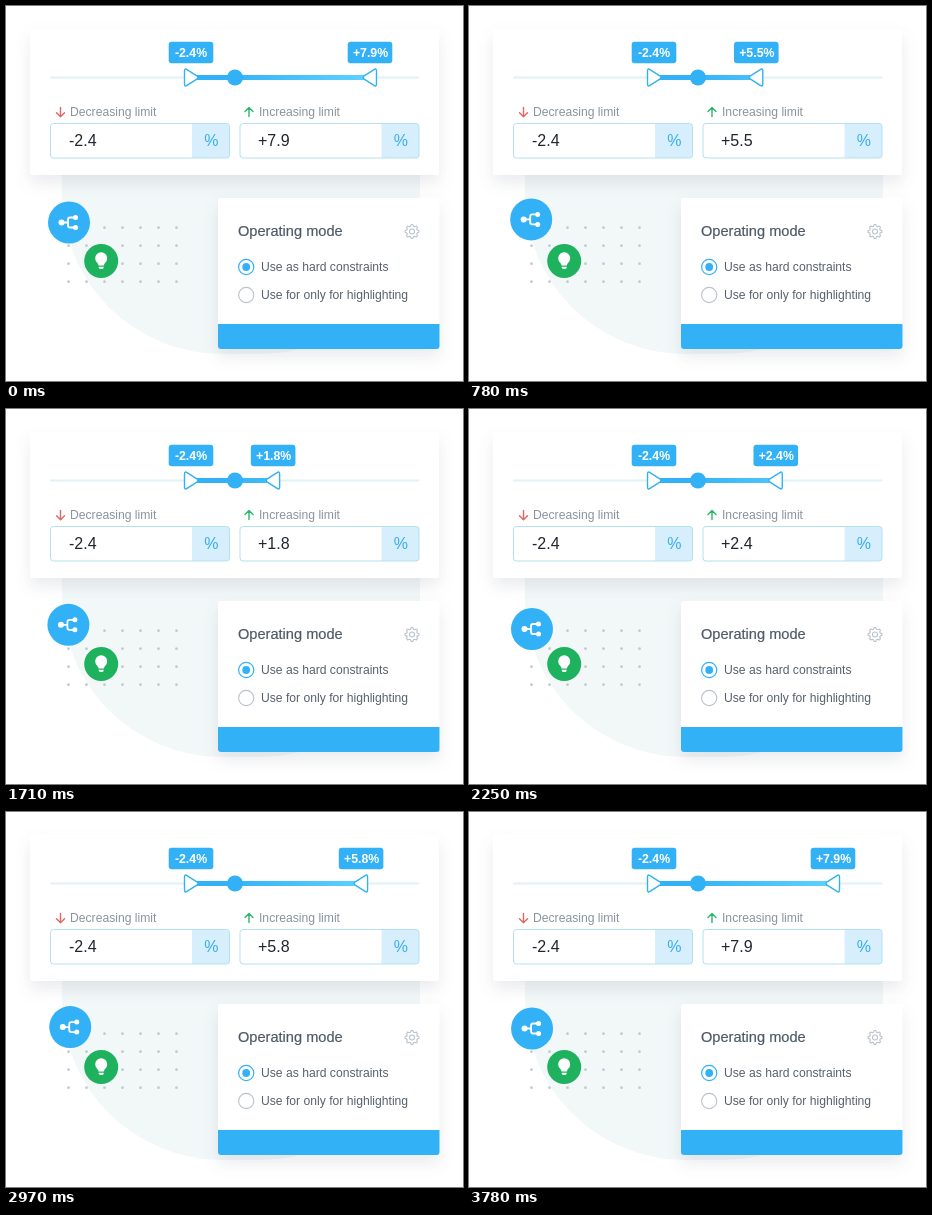
Animation, 457 px wide and 375 px high, one loop 3.81 s. Source, as an HTML page:

```html
<!DOCTYPE html>
<html lang="en">
<head>
<meta charset="utf-8">
<title>Limits and operating mode</title>
<style>
  html, body { margin: 0; width: 100%; height: 100%; overflow: hidden; background: #fff; }
  svg { display: block; width: 457px; height: 375px; font: 12.15px "Liberation Sans", Arial, sans-serif; }
  .card { fill: #fff; filter: drop-shadow(0 8px 8px rgba(45, 55, 90, .1)); }
  .blue { fill: #32b1f6; }
  .line { fill: none; stroke-linecap: round; stroke-linejoin: round; }
  .handle { fill: #fff; stroke: #32b1f6; stroke-width: 1.4; stroke-linejoin: round; }
  .tag { fill: #fff; font-size: 12.3px; font-weight: bold; text-anchor: middle; }
  .value { fill: #20262d; font-size: 16px; }
  .unit { fill: #38ade6; font-size: 16px; text-anchor: middle; }
  .caption { fill: #89949e; }
  .option { fill: #56616d; }
  .title { fill: #4d5966; stroke: #4d5966; stroke-width: .2px; font-size: 14.6px; }
</style>
</head>
<body>
<svg viewBox="0 0 457 375">
  <defs>
    <linearGradient id="range" gradientUnits="userSpaceOnUse" x1="215" y1="0" x2="364" y2="0">
      <stop offset="0" stop-color="#32b1f6"/>
      <stop offset="1" stop-color="#5fd2ff"/>
    </linearGradient>
    <g id="field">
      <rect x=".5" y=".5" width="179" height="34.5" rx="3" fill="#fff"/>
      <path d="M142 .5H176.5Q179.5 .5 179.5 3.5V32Q179.5 35 176.5 35H142Z" fill="#d7effd"/>
      <rect x=".5" y=".5" width="179" height="34.5" rx="3" fill="none" stroke="#b4e1ee"/>
      <text class="unit" x="161.3" y="23">%</text>
    </g>
    <path id="pointer" class="handle" d="M-6.5 65V78Q-6.5 81 -4 79.4L5.8 73.2Q8 71.5 5.8 69.8L-4 63.6Q-6.5 62 -6.5 65Z"/>
    <rect id="plate" class="blue" x="-22.3" y="35.7" width="44.6" height="21.5" rx="3"/>
  </defs>

  <path d="M56 160V188A160 160 0 0 0 216 348H254A160 160 0 0 0 414 188V160Z" fill="#f2f7f8"/>
  <g id="dots" fill="#c3cacf"></g>

  <rect class="card" x="24" y="23" width="409" height="146" rx="2"/>
  <path class="line" d="M45 71.5H412.5" stroke="#e0f2f2" stroke-width="2"/>
  <path id="bar" stroke="url(#range)" stroke-width="5"/>
  <circle class="blue" cx="229" cy="71.5" r="8"/>
  <g transform="translate(185)">
    <use href="#pointer"/>
    <use href="#plate"/>
    <text class="tag" y="50.5">-2.4%</text>
  </g>
  <g id="upper">
    <use href="#pointer" transform="scale(-1 1)"/>
    <use href="#plate"/>
    <text class="tag" id="tag" x=".5" y="50.5"></text>
  </g>

  <path class="line" d="M54.5 101.5V110.5M50.5 106.7L54.5 110.7L58.5 106.7" stroke="#e0675f" stroke-width="1.4"/>
  <path class="line" d="M243 110.5V101.5M239 105.5L243 101.5L247 105.5" stroke="#2bb56a" stroke-width="1.4"/>
  <text class="caption" x="64" y="110">Decreasing limit</text>
  <text class="caption" x="253" y="110">Increasing limit</text>
  <use href="#field" x="44" y="117"/>
  <use href="#field" x="233.5" y="117"/>
  <text class="value" x="63" y="140">-2.4</text>
  <text class="value" id="value" x="252" y="140"></text>

  <rect class="card" x="212" y="192" width="221.5" height="151" rx="3"/>
  <path class="blue" d="M212 318H433.5V340Q433.5 343 430.5 343H215Q212 343 212 340Z"/>
  <text class="title" x="232" y="229.7">Operating mode</text>
  <g class="line" stroke="#b9c2cb" stroke-width="1.1">
    <path id="gear"/>
    <circle cx="406" cy="225.5" r="2.5"/>
    <circle cx="240.2" cy="289" r="7.6"/>
  </g>
  <circle cx="240.2" cy="261" r="7.6" fill="none" stroke="#32b1f6" stroke-width="1.2"/>
  <circle class="blue" cx="240.2" cy="261" r="3.9"/>
  <text class="option" x="255" y="264.5">Use as hard constraints</text>
  <text class="option" x="255" y="292.7">Use for only for highlighting</text>

  <g id="badge">
    <circle class="blue" r="21"/>
    <path class="line" d="M-7 0H-1M6 -5H1Q-1 -5 -1 -3V3Q-1 5 1 5H6" stroke="#fff" stroke-width="1.8"/>
    <g fill="#fff">
      <circle cx="-7.5" r="3"/>
      <circle cx="6.5" cy="-5" r="2.5"/>
      <circle cx="6.5" cy="5" r="2.5"/>
    </g>
  </g>
  <circle cx="95.2" cy="255" r="17" fill="#1fb25e"/>
  <path d="M92.5 259.5Q92.5 257.8 91 256.5A6 6 0 1 1 99.4 256.5Q97.9 257.8 97.9 259.5ZM92.7 260.7H97.7V261.5Q97.7 263 95.2 263Q92.7 263 92.7 261.5Z" fill="#fff"/>
</svg>
<script>
const LOOP = 3810, STEP = 30;
const $ = id => document.getElementById(id);

// Badge drift: time, x, y
const drift = [
  [0, 63, 216.5], [780, 62.2, 213.4], [1710, 62.4, 215.8], [2250, 63, 220],
  [2700, 63.3, 216.2], [3270, 65, 214.6], [LOOP, 63, 216.5]
];

const phase = (t, from, to) => Math.min(1, Math.max(0, (t - from) / (to - from)));
const easeOut = p => 1 - (1 - p) ** 3;
const easeInOut = p => (1 - Math.cos(Math.PI * p)) / 2;

// Smooth closed curve through the drift points
function driftAt(t, axis) {
  const n = drift.length - 1;
  const point = i => {
    const turn = Math.floor(i / n), p = drift[i - turn * n];
    return { t: p[0] + turn * LOOP, v: p[axis] };
  };
  const slope = i => {
    const a = point(i - 1), b = point(i + 1);
    return (b.v - a.v) / (b.t - a.t);
  };
  let i = 0;
  while (t >= drift[i + 1][0]) i++;
  const a = point(i), b = point(i + 1), span = b.t - a.t;
  const u = (t - a.t) / span, u2 = u * u, u3 = u2 * u;
  return (2 * u3 - 3 * u2 + 1) * a.v + (u3 - 2 * u2 + u) * span * slope(i)
       + (3 * u2 - 2 * u3) * b.v + (u3 - u2) * span * slope(i + 1);
}

function drawDots() {
  let dots = "";
  for (let row = 0; row < 4; row++)
    for (let col = 0; col < 7; col++)
      dots += `<circle cx="${62.5 + col * 18}" cy="${221.7 + row * 18}" r="1.4"/>`;
  $("dots").innerHTML = dots;
}

function drawGear() {
  const points = [];
  for (let i = 0; i < 32; i++) {
    const r = i % 4 < 2 ? 7 : 5.4, a = (i - .5) * Math.PI / 16;
    points.push(`${(406 + r * Math.cos(a)).toFixed(2)} ${(225.5 + r * Math.sin(a)).toFixed(2)}`);
  }
  $("gear").setAttribute("d", `M${points.join("L")}Z`);
}

function render(t) {
  const x = 364 - 97 * (easeOut(phase(t, 0, 1920)) - easeOut(phase(t, 1950, LOOP)));
  const amount = 7.9 - 6.1 * (easeInOut(phase(t, 60, 1720)) - easeInOut(phase(t, 1880, 3700)));
  const text = "+" + amount.toFixed(1);
  $("upper").setAttribute("transform", `translate(${x.toFixed(2)})`);
  $("bar").setAttribute("d", `M191 71.5H${(x - 6).toFixed(2)}`);
  $("tag").textContent = text + "%";
  $("value").textContent = text;
  $("badge").setAttribute("transform", `translate(${driftAt(t, 1)} ${driftAt(t, 2)})`);
}

function tick() {
  const t = performance.now() % LOOP;
  render(Math.floor(t / STEP) * STEP);
  requestAnimationFrame(tick);
}

drawDots();
drawGear();
tick();
</script>
</body>
</html>
```
